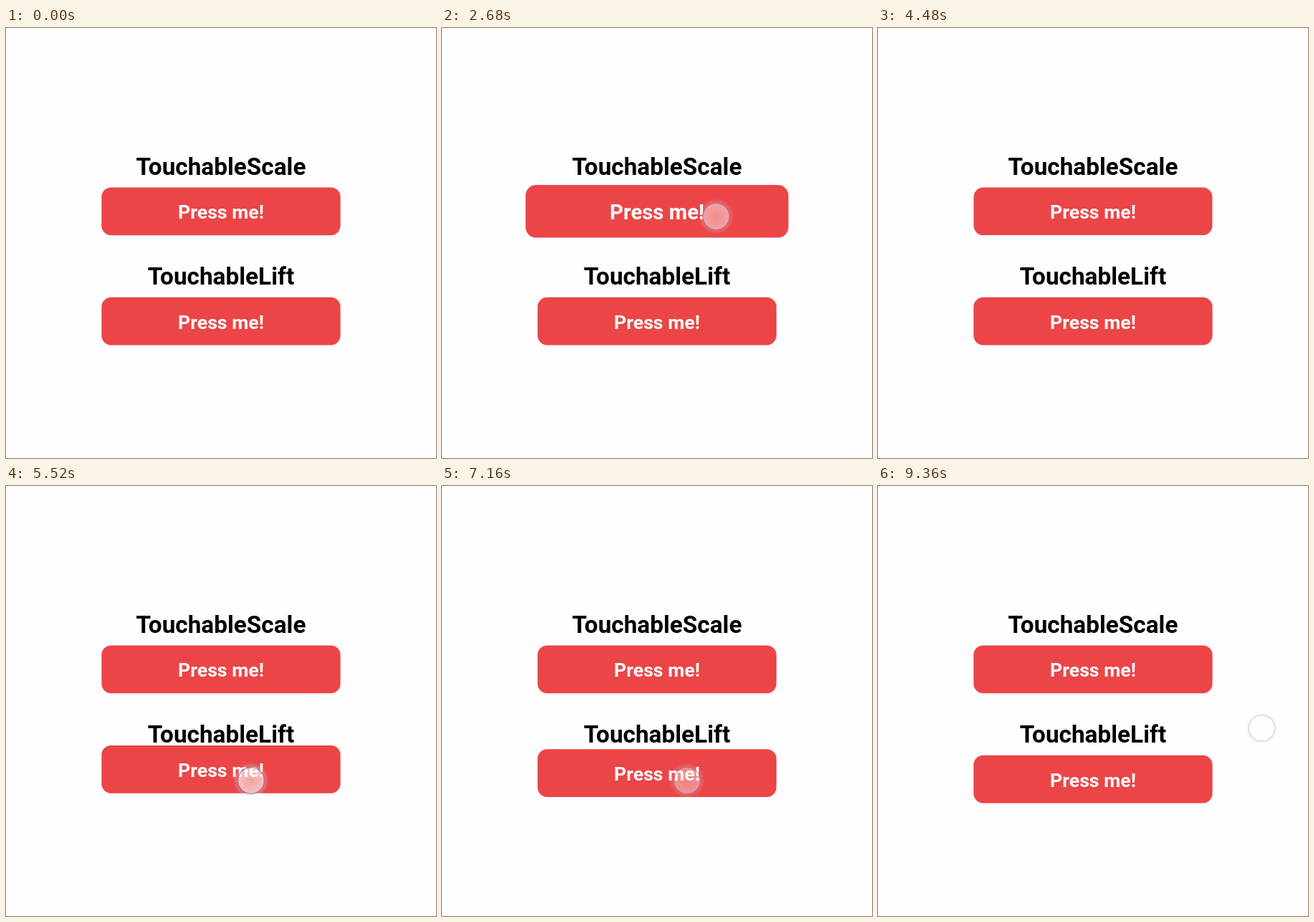
Recreate the animation shown at these times as an HTML page with a canvas. Size 600 by 600 pixels, loop 9.4 s.

```html
<!DOCTYPE html>
<html lang="en">
<head>
<meta charset="utf-8">
<title>Touchable buttons</title>
<style>
  html, body { margin: 0; width: 100%; height: 100%; overflow: hidden; background: #fefdff; }
  canvas { display: block; width: 100vw; height: 100vh; }
</style>
</head>
<body>
<canvas id="stage" width="600" height="600"></canvas>
<script>
const ctx = document.getElementById('stage').getContext('2d');
const LOOP = 9400, STEP = 40;
const FONT = 'Roboto, Arial, sans-serif';
const OMEGA = 20, PRESS_DAMPING = 0.22, RELEASE_DAMPING = 0.4;

// Alternating press and release times, in ms
const scaleTimes = [1587, 2690, 3925, 4000];
const liftTimes = [5235, 6156, 7102, 7169];

const touches = [
  { x: 382.5, y: 263, down: 1460, up: 2630 },
  { x: 382.5, y: 263, down: 3830, up: 3950 },
  { x: 342, y: 411, down: 5140, up: 6040 },
  { x: 342, y: 411, down: 7000, up: 7085 },
  { x: 535.5, y: 338, down: 8500, up: 9240 }
];

const clamp = v => Math.max(0, Math.min(1, v));

// Remaining share of the distance after ms of an underdamped spring
function springRest(ms, zeta) {
  const t = ms / 1000, root = Math.sqrt(1 - zeta * zeta);
  const phase = OMEGA * root * t;
  return Math.exp(-zeta * OMEGA * t) * (Math.cos(phase) + zeta / root * Math.sin(phase));
}

// 0 at rest, 1 when pressed; each spring starts from the last value
function pressAmount(times, now) {
  let value = 0;
  times.forEach((start, i) => {
    if (now < start) return;
    const end = Math.min(now, times[i + 1] ?? now);
    const pressing = i % 2 === 0;
    const target = pressing ? 1 : 0;
    const zeta = pressing ? PRESS_DAMPING : RELEASE_DAMPING;
    value = target + (value - target) * springRest(end - start, zeta);
  });
  return Math.abs(value) < 0.004 ? 0 : value;
}

function drawText(text, x, baseline, size, color) {
  ctx.font = `700 ${size}px ${FONT}`;
  ctx.textAlign = 'center';
  ctx.textBaseline = 'alphabetic';
  ctx.fillStyle = color;
  ctx.fillText(text, x, baseline);
}

function drawButton(y, scale) {
  ctx.save();
  ctx.translate(300, y);
  ctx.scale(scale, scale);
  ctx.fillStyle = '#eb4547';
  ctx.beginPath();
  ctx.roundRect(-166.67, -33.33, 333.33, 66.67, 13.33);
  ctx.fill();
  drawText('Press me!', 0, 10.5, 26.67, '#fff');
  ctx.restore();
}

function drawTouch({ x, y, down, up }, now) {
  const alpha = clamp((now - down) / 150) * clamp(1 - (now - up) / 200);
  if (alpha <= 0) return;
  ctx.save();
  ctx.translate(x, y);
  ctx.globalAlpha = alpha;

  const glow = ctx.createRadialGradient(0, 0, 17, 0, 0, 25);
  glow.addColorStop(0, 'rgba(255,225,235,.4)');
  glow.addColorStop(1, 'rgba(255,225,235,0)');
  ctx.fillStyle = glow;
  ctx.beginPath();
  ctx.arc(0, 0, 25, 0, Math.PI * 2);
  ctx.arc(0, 0, 17, 0, Math.PI * 2, true);
  ctx.fill();

  const body = ctx.createRadialGradient(0, 0, 0, 0, 0, 18);
  body.addColorStop(0, 'rgba(255,255,255,.5)');
  body.addColorStop(1, 'rgba(255,255,255,.66)');
  ctx.fillStyle = body;
  ctx.beginPath();
  ctx.arc(0, 0, 18, 0, Math.PI * 2);
  ctx.fill();

  ctx.strokeStyle = 'rgba(115,115,150,.52)';
  ctx.lineWidth = 2.2;
  ctx.beginPath();
  ctx.arc(0, 0, 18.4, 0, Math.PI * 2);
  ctx.stroke();
  ctx.restore();
}

function draw(now) {
  ctx.fillStyle = '#fefdff';
  ctx.fillRect(0, 0, 600, 600);
  drawText('TouchableScale', 300, 205, 33.33, '#000');
  drawText('TouchableLift', 300, 358.3, 33.33, '#000');
  drawButton(255.8, 1 + 0.1 * pressAmount(scaleTimes, now));
  drawButton(409.1 - 16.67 * pressAmount(liftTimes, now), 1);
  touches.forEach(touch => drawTouch(touch, now));
}

function tick() {
  const now = performance.now() % LOOP;
  draw(Math.floor(now / STEP) * STEP);
  requestAnimationFrame(tick);
}
tick();
</script>
</body>
</html>
```
